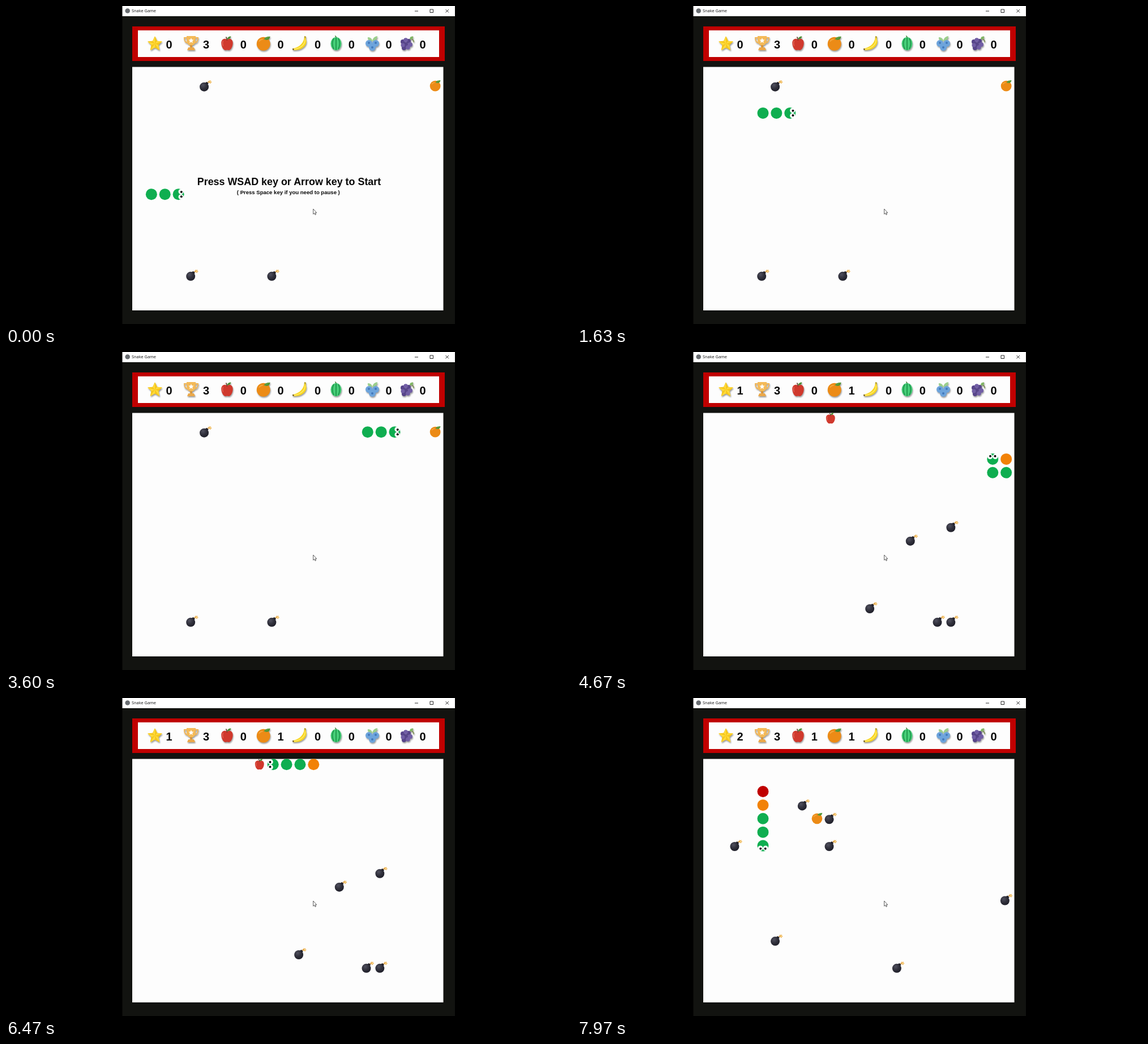
Write an HTML page that moves like this. It is 998x561 px and loops after 8000 ms.

```html
<!DOCTYPE html>
<html lang="en">
<head>
<meta charset="utf-8">
<title>Snake Game</title>
<style>
  html, body { margin: 0; width: 100%; height: 100%; overflow: hidden; background: #000; }
  svg { display: block; width: 100%; height: 100%; }
  text { font-family: "Liberation Sans", Arial, sans-serif; font-weight: bold; text-anchor: middle; fill: #080808; }
  .title { font: 7.4px "Open Sans", sans-serif; text-anchor: start; fill: #111; }
  .icons { filter: drop-shadow(1.5px 2px 1.2px rgba(0, 0, 0, .38)); }
</style>
</head>
<body>
<svg viewBox="0 0 998 561">
  <defs>
    <radialGradient id="bombShade" cx=".38" cy=".32" r=".75">
      <stop offset="0" stop-color="#50505e"/><stop offset=".5" stop-color="#30303b"/><stop offset="1" stop-color="#1c1c26"/>
    </radialGradient>
    <g id="bomb">
      <path d="M3-5Q4.500-8 8-8" fill="none" stroke="#c58a35" stroke-width="1.4"/>
      <circle cx="-2.300" cy="1.500" r="8" fill="url(#bombShade)"/>
      <path d="M0-6L3.500-2.500 5.500-4.500 2-7.500Z" fill="#20202a"/>
      <path d="M6-10.500L8-9 9.500-10.500 9.700-8 11.500-7 9.500-6 9-4 7.500-5.500 5.500-5.500 6-7.500Z" fill="#edb04d"/>
      <circle cx="8.300" cy="-7.300" r="1" fill="#fff0b8"/>
    </g>
    <g id="star">
      <path id="starShape" d="M0-12.500L3.700-4.400 12.300-3.600 5.900 2.300 7.700 11 0 6.500-7.700 11-5.900 2.300-12.300-3.600-3.700-4.400Z" fill="#f6c71c" stroke="#f6c71c" stroke-linejoin="round"/>
      <path d="M0 0L0-12.500-3.700-4.400ZM0 0L-12.300-3.600-5.900 2.300ZM0 0L-7.700 11 0 6.500ZM0 0L7.700 11 5.900 2.300ZM0 0L12.300-3.600 3.700-4.400Z" fill="#ffdb3d"/>
    </g>
    <g id="trophy">
      <path d="M-7-10H-12Q-12-1-5-1M7-10H12Q12-1 5-1" fill="none" stroke="#f0b456" stroke-width="2"/>
      <path d="M-8-13H8V-6Q8 3 0 4-8 3-8-6Z" fill="#f4ba58"/>
      <path d="M-1.800 3H1.800V8H-1.800Z" fill="#d99538"/>
      <path d="M-5 7H5L7 12H-7Z" fill="#eba94b"/>
      <use href="#starShape" transform="translate(0 -5) scale(.34)" style="filter:brightness(0) invert(1)"/>
    </g>
    <g id="apple">
      <path d="M0-7C4-11 10.500-8 10.200-1 10 6 6 11.500 3 11.500Q0 10.500-3 11.500C-6 11.500-10 6-10.200-1-10.500-8-4-11 0-7Z" fill="#d0392d"/>
      <path d="M-7-5Q-9-1-7 4" fill="none" stroke="#e3685a" stroke-width="1.500"/>
      <path d="M0-6Q0-9-2-12" fill="none" stroke="#5b3524" stroke-width="1.500"/>
      <path d="M0-8Q1-13 7-13 6-8 0-8Z" fill="#4a8e35"/>
    </g>
    <g id="orange">
      <circle r="12" fill="#ec8b16"/>
      <path d="M-8-4Q-5-8-1-8" fill="none" stroke="#f4a53b" stroke-width="2"/>
      <path d="M1-8Q3-13 12-13 11-6 4-7Z" fill="#4d9336"/>
      <path d="M2-8L10-12" stroke="#77b34f" stroke-width=".8"/>
    </g>
    <g id="banana">
      <path d="M8-13L11-12 10.500-8C15 1 6 12-9 12Q-13 12-13 9C-4 8 5 2 7.500-8Z" fill="#f8d51f"/>
      <path d="M9-7C10 1 2 9-11 10.500" fill="none" stroke="#ffea68" stroke-width="1.600"/>
      <path d="M8-13L11-12 10.500-9.500 7.800-10Z" fill="#b3a03a"/>
      <path d="M-13 9L-10.500 9-10.500 12-12.500 11.700Z" fill="#705b2b"/>
    </g>
    <g id="melon">
      <path d="M0-10Q0-13-2-13" fill="none" stroke="#4b8740" stroke-width="1.500"/>
      <ellipse cy=".5" rx="9.500" ry="11.500" fill="#46cf78"/>
      <path d="M-4-9Q-9 0-4 10M0-10.500V11.500M4-9Q9 0 4 10" fill="none" stroke="#219b50" stroke-width="2"/>
    </g>
    <g id="berries">
      <path d="M0-4Q-9-5-8-11-1-11 0-4Q1-12 9-13 9-5 0-4Z" fill="#9bcf8c"/>
      <g fill="#6da4dc"><circle cx="-6" cy="0" r="6"/><circle cx="6" cy="0" r="6"/><circle cy="7" r="6"/></g>
      <g fill="#4379bb"><circle cx="-6" cy="-1" r="2"/><circle cx="6" cy="-1" r="2"/><circle cy="7" r="2"/></g>
    </g>
    <g id="grapes">
      <path d="M4-6Q8-11 10-12M7-8Q12-6 11-2" fill="none" stroke="#79904d" stroke-width="1.500"/>
      <path d="M4-7Q4-13 10-12 12-8 4-7Z" fill="#81b667"/>
      <g fill="#57458a"><circle cx="-8" cy="-3" r="4"/><circle cx="2" cy="-4" r="4"/><circle cx="-3" cy="2" r="4"/><circle cx="-6" cy="8" r="4"/></g>
      <g fill="#715ea5"><circle cx="-3" cy="-6" r="3.800"/><circle cx="5" cy="2" r="4"/><circle cx="-8" cy="3" r="3.500"/><circle cx="1" cy="7" r="3.800"/></g>
    </g>
    <g id="head">
      <circle r="10" fill="#0fae50"/>
      <g fill="#fff"><circle cx="4.500" cy="-4.600" r="4.600"/><circle cx="4.500" cy="4.600" r="4.600"/></g>
      <g fill="#080808"><circle cx="5.200" cy="-4.200" r="2"/><circle cx="5.200" cy="4.200" r="2"/></g>
    </g>
  </defs>

  <path d="M205.500 0H793V561H205.500Z" fill="#121310"/>
  <path d="M205.500 0H793V18H205.500Z" fill="#fff"/>
  <circle cx="214.700" cy="8.500" r="4.300" fill="#686c70"/>
  <text class="title" x="222" y="11.300">Snake Game</text>
  <path d="M722 9H728M749 6H754.500V11.500H749ZM776.500 6L782 11.500M782 6L776.500 11.500" fill="none" stroke="#111" stroke-width=".9"/>
  <path d="M223 36H775V97H223Z" fill="#c00000"/>
  <path d="M233 43H765V90H233Z" fill="#fdfdfd"/>
  <path d="M223 107.500H772.500V537H223Z" fill="#fdfdfd"/>
  <g class="icons" id="icons"></g>
  <g id="counters"></g>
  <g id="items"></g>
  <g id="snake"></g>
  <g id="prompt">
    <text x="500" y="316.300" font-size="17.900">Press WSAD key or Arrow key to Start</text>
    <text x="498.800" y="331.500" font-size="9.550">( Press Space key if you need to pause )</text>
  </g>
  <path d="M542.700 358V367.200L544.700 365.400 546 368.400 547.500 367.700 546.200 364.800H548.800Z" fill="#fff" stroke="#333" stroke-width=".8"/>
</svg>
<script>
const LOOP = 8000;
const byId = id => document.getElementById(id);
const place = ([col, row]) => `translate(${233 + 23.87 * col} ${117.3 + 23.87 * row})`;
const sprite = (name, cell, scale = 1) => `<use href="#${name}" transform="${place(cell)} scale(${scale})"/>`;

// Header: icon name, icon centre, counter centre
const header = [
  ["star", 263, 66.5, 288], ["trophy", 327, 66, 353.5], ["apple", 390.5, 66.5, 419.3],
  ["orange", 454.7, 66.7, 485], ["banana", 519, 66, 550.5], ["melon", 583, 66, 610.3],
  ["berries", 647, 66, 676], ["grapes", 709, 66, 736]
];
byId("icons").innerHTML = header.map(([name, x, y]) => `<use href="#${name}" x="${x}" y="${y}"/>`).join("");
byId("counters").innerHTML = header.map(h => `<text x="${h[3]}" y="74.800" font-size="20">0</text>`).join("");
const counters = [...byId("counters").children];

// Each stage begins when the head reaches a fruit
const stages = [
  { step: 0, fruit: "orange", at: [22, 1], bombs: [[5, 1], [4, 15], [10, 15]], counts: [0, 3, 0, 0, 0, 0, 0, 0] },
  { step: 27, fruit: "apple", at: [9, 0], bombs: [[18, 8], [15, 9], [12, 14], [17, 15], [18, 15]], counts: [1, 3, 0, 1, 0, 0, 0, 0] },
  { step: 47, fruit: "orange", at: [8, 4], bombs: [[7, 3], [9, 4], [2, 6], [9, 6], [22, 10], [5, 13], [14, 15]], counts: [2, 3, 1, 1, 0, 0, 0, 0] }
];

const dirs = { R: [1, 0, 0], D: [0, 1, 90], L: [-1, 0, 180], U: [0, -1, -90] };
const route = "U6 R7 U1 R1 U1 R11 D3 L1 U4 L17 D6";
const tail = 2;
const path = [[1, 9, 0], [2, 9, 0], [3, 9, 0]];
for (const leg of route.split(" ")) {
  const [dx, dy, angle] = dirs[leg[0]];
  for (let n = +leg.slice(1); n > 0; n--) {
    const [x, y] = path[path.length - 1];
    path.push([x + dx, y + dy, angle]);
  }
}

// Pace of the snake: [step, ms], evenly spaced between entries
const pace = [[1, 525], [16, 2420], [23, 3325], [25, 3610], [32, 4560], [47, 6480], [58, 7880]];
function stepAt(ms) {
  if (ms < pace[0][1]) return 0;
  for (let i = 1; i < pace.length; i++) {
    const [s0, t0] = pace[i - 1], [s1, t1] = pace[i];
    if (ms < t1) return Math.floor(s0 + (s1 - s0) * (ms - t0) / (t1 - t0));
  }
  return 58;
}

const bodyColors = ["#0fae50", "#0fae50", "#f28207", "#c00000"];
byId("snake").innerHTML = '<use href="#head"/>' + bodyColors.map(c => `<circle r="10" fill="${c}"/>`).join("");
const segments = [...byId("snake").children];

let shownStep = -1, shownStage = null;
function render(ms) {
  const step = stepAt(ms);
  if (step === shownStep) return;
  shownStep = step;
  const level = stages.findLastIndex(s => step >= s.step), stage = stages[level];
  if (stage !== shownStage) {
    shownStage = stage;
    byId("items").innerHTML = sprite(stage.fruit, stage.at, .78) + stage.bombs.map(b => sprite("bomb", b)).join("");
    stage.counts.forEach((n, i) => counters[i].textContent = n);
  }
  segments.forEach((el, i) => {
    const shown = i < 3 + level;
    el.style.display = shown ? "" : "none";
    if (!shown) return;
    const cell = path[step + tail - i];
    el.setAttribute("transform", place(cell) + (i ? "" : ` rotate(${cell[2]})`));
  });
  byId("prompt").style.display = step ? "none" : "";
}

const start = performance.now();
function tick() {
  render((performance.now() - start) % LOOP);
  requestAnimationFrame(tick);
}
tick();
</script>
</body>
</html>
```
